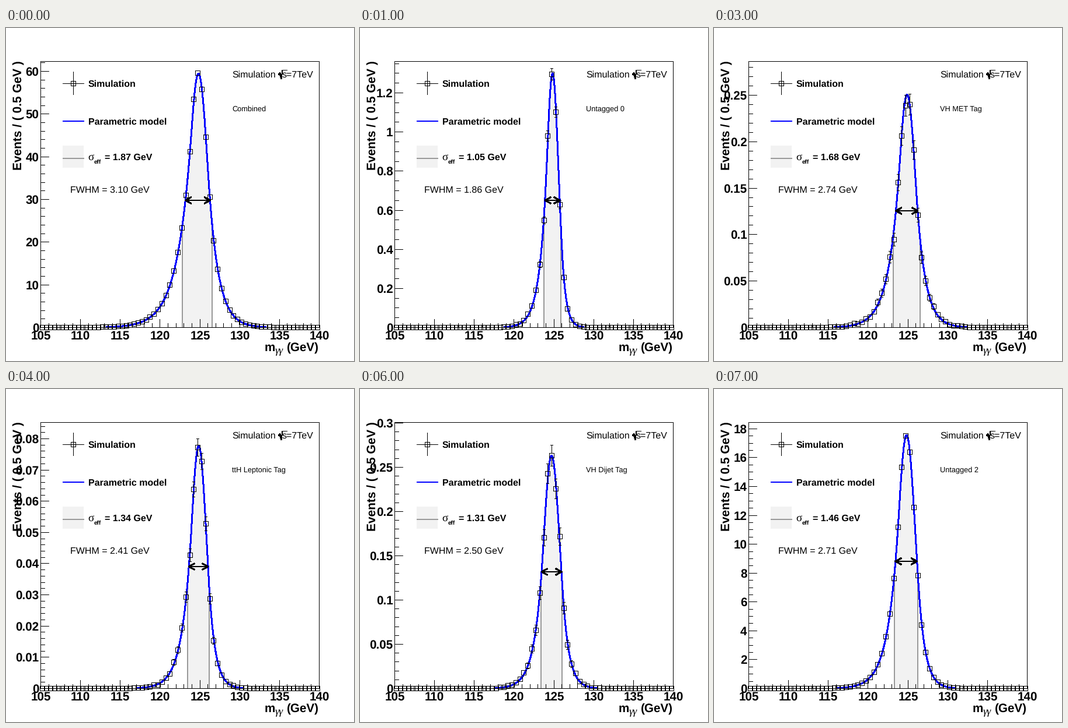
Animation, 596 px wide and 572 px high, one loop 8 s. Source, as a matplotlib script:

```python
from itertools import starmap
from math import log

import numpy as np
import matplotlib.pyplot as plt
from matplotlib.animation import FuncAnimation
from matplotlib.patches import Rectangle

W, H = 596, 572
PT = 0.72                                # points per pixel at 100 dpi
LEFT, RIGHT, TOP, BASE = 59.5, 536.5, 57.5, 514.5
GEV = (RIGHT - LEFT) / 35                # pixels per GeV
BLUE, GREY, SHADE = "#0000ff", "#999999", "#f2f2f2"

plt.rcParams["text.hinting"] = "none"


class Plot:
    """A Gaussian peak that turns into exponential tails on both sides.

    k_left and k_right tell after how many widths each tail begins.
    """

    def __init__(self, name, ymax, step, minor, sigma, fwhm,
                 peak, mean, k_left, k_right, noise):
        self.name, self.ymax, self.step, self.minor = name, ymax, step, minor
        self.sigma, self.fwhm, self.noise = sigma, fwhm, noise
        self.height = peak / ymax * (BASE - TOP)
        self.mean, self.k_left, self.k_right = mean, k_left, k_right
        self.width = fwhm / (half_width(k_left) + half_width(k_right))

    def model(self, mass):
        """Height of the curve in pixels."""
        t = (mass - self.mean) / self.width
        k = np.where(t < 0, self.k_left, self.k_right)
        t = np.abs(t)
        return self.height * np.exp(np.where(t < k, -t * t / 2,
                                             k * k / 2 - k * t))


def half_width(k):
    """Distance from mean to half maximum, in widths."""
    core = (2 * log(2)) ** .5
    return core if k > core else log(2) / k + k / 2


PLOTS = list(starmap(Plot, [
    ("Combined", 62.32, 10, 5, 1.87, 3.10, 59.5, 124.82, .69, .98, .08),
    ("Untagged 0", 1.361, .2, 4, 1.05, 1.86, 1.3, 124.83, .85, 1.45, .5),
    ("Untagged 1", 15.72, 2, 4, 1.24, 2.29, 14.9, 124.83, .85, 1.35, .18),
    ("VH MET Tag", .2863, .05, 5, 1.68, 2.74, .2506, 124.9, .8, 1, .93),
    ("ttH Leptonic Tag", .08522, .01, 5, 1.34, 2.41, .0778, 124.85, .85,
     1.25, .75),
    ("VH Lepton Tag", .2637, .05, 5, 1.36, 2.42, .235, 124.83, .85, 1.25,
     .85),
    ("VH Dijet Tag", .3007, .05, 5, 1.31, 2.50, .2632, 124.71, 1, 1.3, .93),
    ("Untagged 2", 18.44, 2, 4, 1.46, 2.71, 17.57, 124.83, .85, 1.3, .14),
]))

fig = plt.figure(figsize=(W / 100, H / 100), dpi=100, facecolor="white")
ax = fig.add_axes([0, 0, 1, 1])


def px(mass):
    return LEFT + (mass - 105) * GEV


def centre(v):
    """Centre of the pixel that holds v."""
    return np.floor(v) + .5


def line(x, y, color="black", lw=1, z=5, **kw):
    ax.plot(x, y, color=color, lw=lw * PT, zorder=z, snap=False,
            antialiased=False, solid_joinstyle="miter", **kw)


def text(x, y, s, size, bold=False, ha="left", font="Liberation Sans",
         **kw):
    ax.text(x, y, s, fontsize=size * PT, family=font, ha=ha, va="baseline",
            weight="bold" if bold else "normal", zorder=8, **kw)


def square(x, y):
    line([x - 4, x + 4, x + 4, x - 4, x - 4],
         [y - 4, y - 4, y + 4, y + 4, y - 4], z=6)


def draw_axes(plot):
    line([LEFT, RIGHT, RIGHT, LEFT, LEFT], [TOP, TOP, BASE, BASE, TOP])
    for mass in range(105, 141):
        major = mass % 5 == 0
        x = centre(px(mass))
        line([x, x], [BASE, BASE - (14 if major else 7)])
        if major:
            text(x, 535, str(mass), 20.6, True, "center")
    for i in range(int(plot.ymax / plot.step * plot.minor) + 1):
        value = i * plot.step / plot.minor
        y = centre(BASE - value / plot.ymax * (BASE - TOP))
        major = i % plot.minor == 0
        line([LEFT, LEFT + (14 if major else 7)], [y, y])
        if major:
            text(56.5, y + 7.5, f"{value:g}", 20.6, True, "right")
    text(27, 56.5, "Events / ( 0.5 GeV )", 20.9, True, ha="right",
         rotation=90, rotation_mode="anchor")
    text(442.5, 555, "m", 20.6, True)
    text(461, 559, "γγ", 18, font="Liberation Serif", style="italic")
    text(481, 555, "(GeV)", 20.6, True)


def draw_legend(plot):
    line([97.5, 133.5], [95.5, 95.5])
    line([115.5, 115.5], [75.5, 114.5])
    square(115.5, 95.5)
    text(141, 101, "Simulation", 16, True)
    line([98, 133], [160, 160], BLUE, 2)
    text(141, 166, "Parametric model", 16, True)
    ax.add_patch(Rectangle((97, 202), 36, 38, fc=SHADE, ec="none"))
    line([98, 133], [224, 224], GREY, 2)
    text(140.5, 227, "σ", 19, font="Liberation Serif")
    text(151, 233, "eff", 10, True)
    text(169, 227, f"= {plot.sigma:.2f} GeV", 16, True)
    text(110, 283, f"FWHM = {plot.fwhm:.2f} GeV", 16)
    text(387, 85, "Simulation", 16)
    line([467.5, 469, 471.5], [79, 78, 86.5], lw=2)
    line([471.5, 473.5, 481.5], [86.5, 72.5, 72.5])
    text(473, 85, "s=7TeV", 16)
    text(387, 143, plot.name, 12.7)


def draw_model(plot):
    mass = np.linspace(105, 140, 1401)
    h = plot.model(mass)
    x, y = px(mass), BASE - h

    # The shaded window of width 2 sigma holds the largest area.
    n = round(2 * plot.sigma / (mass[1] - mass[0]))
    area = np.cumsum(h)
    lo = int(np.argmax(area[n:] - area[:-n])) + 1
    hi = lo + n
    ax.fill_between(x[lo:hi], y[lo:hi], BASE, color=SHADE, lw=0, zorder=1)
    for i in (lo, hi):
        line([round(x[i])] * 2, [BASE, y[i]], GREY, 2, 2,
             solid_capstyle="butt")
    seen = h > .8
    line(x[seen], y[seen], BLUE, 2, 4)

    wide = x[h > plot.height / 2]
    a, b, mid = wide[0], wide[-1], np.floor(BASE - plot.height / 2)
    line([a, b], [mid, mid], lw=2)
    for tip, d in ((a, 9), (b, -9)):
        line([tip + d, tip, tip + d], [mid - 5, mid, mid + 5], lw=2)


def draw_data(plot, seed):
    mass = np.arange(105.25, 140, .5)
    h = plot.model(mass)
    scatter = np.random.default_rng(seed).normal(0, .5, len(mass))
    h = np.maximum(h + scatter * plot.noise * np.sqrt(h), 0)
    errors = np.floor(plot.noise * np.sqrt(h))
    for x, y, err in zip(centre(px(mass)), centre(BASE - h), errors):
        square(x, y)
        if err > 4:
            for s in (-1, 1):
                line([x, x], [y + s * 5, y + s * err])
                line([x - 2, x + 2], [y + s * err] * 2)


def draw(i):
    ax.clear()
    ax.set_xlim(0, W)
    ax.set_ylim(H, 0)
    ax.axis("off")
    plot = PLOTS[i]
    draw_model(plot)
    draw_data(plot, i)
    draw_axes(plot)
    draw_legend(plot)
    return []


anim = FuncAnimation(fig, draw, frames=len(PLOTS), interval=1000,
                     init_func=lambda: [], repeat=True, repeat_delay=0)
plt.show()
```
